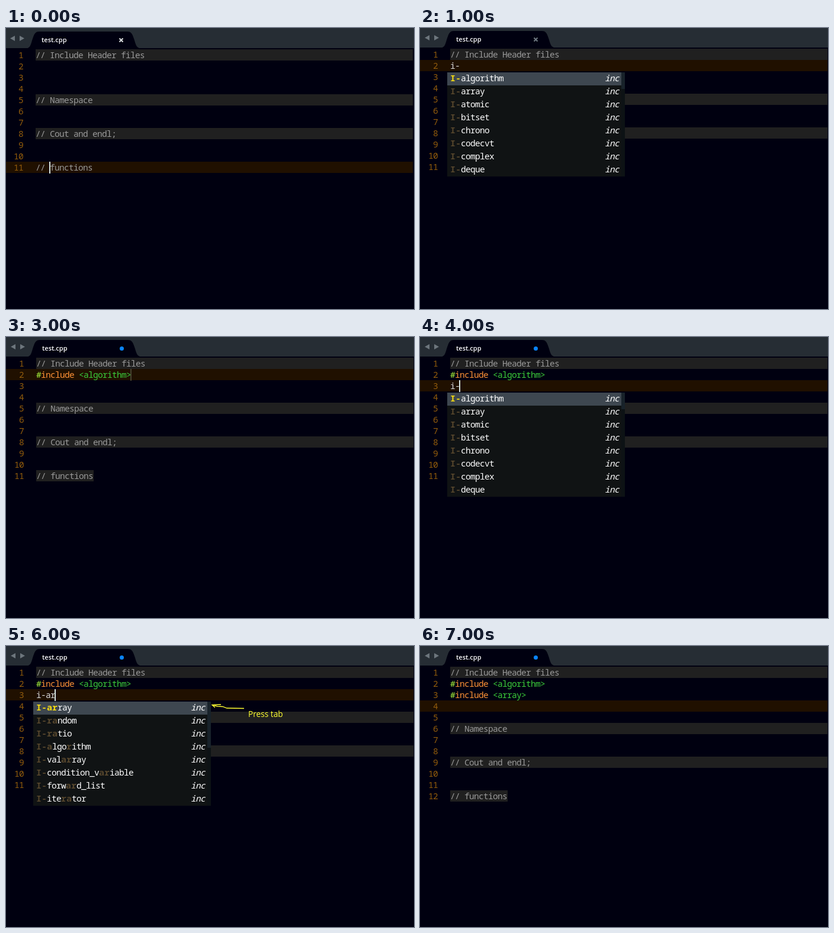
An HTML page for the animation above (8 s loop, 689 by 475 pixels).

```html
<!DOCTYPE html>
<html lang="en">
<head>
<meta charset="utf-8">
<title>Editor autocompletion</title>
<style>
html, body { margin: 0; width: 100%; height: 100%; overflow: hidden; background: #000010; }
svg { display: block; width: 689px; height: 475px; }
text { white-space: pre; }
.code { font: 14.5px "Noto Sans Mono", "DejaVu Sans Mono", monospace; letter-spacing: -0.7px; }
.bold { font-size: 15px; font-weight: 600; letter-spacing: 0; }
.kind { font-style: italic; }
.tab { font: 600 11px "Open Sans", "Noto Sans", sans-serif; }
.note { font: 13.7px "Open Sans", "Noto Sans", sans-serif; }
</style>
</head>
<body>
<svg id="stage" viewBox="0 0 689 475"></svg>
<script>
const stage = document.getElementById("stage");
const STEP = 1000;
const ROW = 19, ITEM = 22, LEFT = 51, CHAR = 8;
const BACK = "#000010", HIT = "#f7dc12", DIM_HIT = "#57472d";

const comments = ["Include Header files", "Namespace", "Cout and endl;", "functions"];
const allItems = ["algorithm", "array", "atomic", "bitset", "chrono", "codecvt", "complex", "deque"]
  .map(name => "*I-*" + name);
// Asterisks enclose the matched letters.
const arItems = ["*I-ar*ray", "*I-ra*ndom", "*I-ra*tio", "*I-a*lgo*r*ithm", "*I-*val*ar*ray",
  "*I-*condition_v*ar*iable", "*I-*forw*ar*d_list", "*I-*ite*ra*tor"];

const plain = [1, 5, 8, 11];
const first = { notes: plain, active: 2, typed: "i-", mark: "close", items: allItems, thumb: 28 };
const second = { notes: plain, active: 3, includes: ["algorithm"], typed: "i-", caret: 67,
  mark: "dot", items: allItems, thumb: 28 };
const narrowed = { ...second, typed: "i-ar", caret: 83, items: arItems, thumb: 78 };

const scenes = [
  { notes: plain, active: 11, caret: 75, mark: "bright", dx: -1, dy: 1 },
  first,
  { ...first, hint: { arrow: [7, -16.5], x: 414, y: 122 } },
  { notes: plain, active: 2, includes: ["algorithm"], caret: 211, faint: true, mark: "dot" },
  second,
  narrowed,
  { ...narrowed, hint: { arrow: [0, 0], x: 409, y: 120 } },
  { notes: [1, 6, 9, 12], active: 4, includes: ["algorithm", "array"], mark: "dot" }
];

const esc = s => s.replace(/&/g, "&amp;").replace(/</g, "&lt;");
const span = (s, fill, cls = "") => `<tspan class="${cls}" fill="${fill}">${esc(s)}</tspan>`;
const text = (x, y, body, fill = "#fff", cls = "code", more = "") =>
  `<text x="${x}" y="${y}" class="${cls}" fill="${fill}" ${more}>${body}</text>`;
const rect = (x, y, w, h, fill) =>
  `<rect x="${x}" y="${y}" width="${w}" height="${h}" fill="${fill}"/>`;
const path = (d, style) => `<path d="${d}" ${style}/>`;
const rowTop = line => 16 + ROW * line;
const baseline = line => rowTop(line) + 15;

function header(mark) {
  let out = rect(-2, -2, 694, 35, "#262d34");
  out += path("M35 33.5C43 33 43 25 46 17C49 8 51 5 57 5H206C212 5 214 8 217 17C220 25 220 33 229 33.5Z",
    `fill="${BACK}"`);
  out += path("M16 12V21L8 16.5ZM24 12V21L32 16.5Z", 'fill="#6d767d"');
  out += text(61, 23, "test.cpp", "#fff", "tab");
  if (mark === "dot") return out + '<circle cx="195.5" cy="19.5" r="3.5" fill="#0a84ff"/>';
  const color = mark === "bright" ? "#d4d7d9" : "#6c767e";
  return out + path("M192.5 16.5L198.5 22.5M198.5 16.5L192.5 22.5",
    `stroke="${color}" stroke-width="2.2"`);
}

function editor(s) {
  const last = s.notes[3];
  let out = rect(-2, rowTop(s.active), 690, ROW, "#201000");
  s.notes.forEach((line, i) => {
    const label = "// " + comments[i];
    const width = line === last ? label.length * CHAR + 1 : 637;
    if (line !== s.active) out += rect(LEFT, rowTop(line), width, ROW, "#202020");
    out += text(LEFT, baseline(line), label, "#999");
  });
  for (let n = 1; n <= last; n++)
    out += text(30 - CHAR * String(n).length, baseline(n), n, "#925c0c");
  (s.includes || []).forEach((name, i) => {
    out += text(LEFT, baseline(i + 2),
      span("#", "#a8f53c") + span("include ", "#ff9236") + span(`<${name}>`, "#3acb3a"));
  });
  if (s.typed) out += text(LEFT, baseline(s.active), s.typed, "#d8d8d8");
  if (s.caret)
    out += rect(s.caret - 1, rowTop(s.active), 2, ROW + 1, s.faint ? "#45422f" : "#d5e4e4");
  return out;
}

function popup(s) {
  const y0 = rowTop(s.active) + ROW + 2;
  let out = rect(46, y0, 300, ITEM * 8, "#101314");
  out += rect(46, y0, 294, ITEM, "#3e4750");
  out += rect(340, y0, 6, ITEM * 8, "#0d1215") + rect(340, y0, 6, s.thumb, "#18222a");
  s.items.forEach((item, i) => {
    const hit = i ? DIM_HIT : HIT;
    const body = item.split("*")
      .map((part, k) => part && span(part, k % 2 ? hit : "#fff", k % 2 ? "bold" : "")).join("");
    const y = y0 + ITEM * i + 15;
    out += text(LEFT, y, body) + text(312, y, "inc", "#fff", "code kind");
  });
  return out;
}

function hint(h) {
  const arrow = path("M402 105.5L373 105L366 102.5L357 102L348 99.5M363 99L348 99.5L353 104",
    `fill="none" stroke="#ffff30" stroke-width="1.3" transform="translate(${h.arrow})"`);
  return arrow + text(h.x, h.y, "Press tab", "#ffff30", "note");
}

function draw(s) {
  stage.innerHTML = rect(0, 0, 689, 475, BACK) +
    `<g transform="translate(${s.dx || 0} ${s.dy || 0})">` +
    header(s.mark) + editor(s) + (s.items ? popup(s) : "") + (s.hint ? hint(s.hint) : "") + "</g>";
}

let shown = -1;
const start = performance.now();
function tick(now) {
  const index = Math.floor(Math.max(0, now - start) / STEP) % scenes.length;
  if (index !== shown) draw(scenes[shown = index]);
  requestAnimationFrame(tick);
}
tick(start);
</script>
</body>
</html>
```
